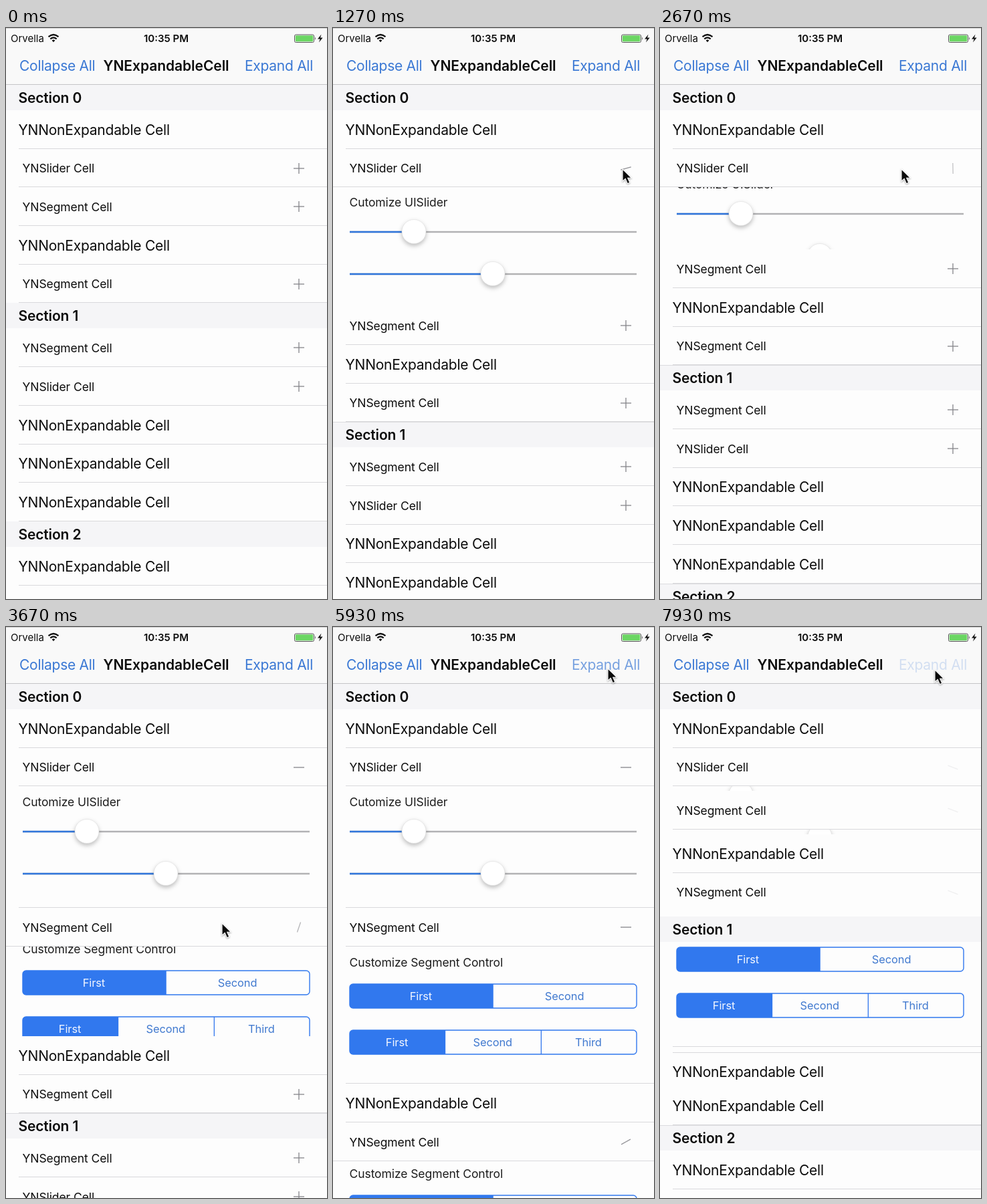
Write an HTML page that moves like this. It is 480x854 px and loops after 8000 ms.

```html
<!DOCTYPE html>
<html lang="en">
<head>
<meta charset="utf-8">
<title>Expandable cells</title>
<style>
  html, body { margin: 0; width: 100%; height: 100%; overflow: hidden; background: #fdfdfd; }
  #stage { position: relative; width: 480px; height: 854px; overflow: hidden; background: #fdfdfd;
    font: 21px Inter, "Open Sans", sans-serif; letter-spacing: -.22px; color: #0c0c0c; white-space: nowrap; }
  #stage > * { position: absolute; left: 0; }
  svg { display: block; overflow: visible; }
  .row, .head { width: 480px; box-sizing: border-box; display: flex; align-items: center; padding-left: 18.5px; }
  .row { background: #fdfdfd; z-index: 4; }
  .row.small { padding-left: 24.5px; font-size: 17.5px; letter-spacing: -.08px; }
  .row::after, .detail::after { content: ""; position: absolute; left: 19px; right: 0; bottom: 0; height: 1px; background: #d9d9dc; }
  .row.wide::after { left: 0; }
  .icon { position: absolute; left: 427px; top: 50%; margin-top: -11px; }
  .head { background: #f5f5f7; font-weight: 600; letter-spacing: -.15px; z-index: 6; }
  .head.moved { box-shadow: inset 0 1px #dcdcdf; }
  .detail { width: 480px; background: #fdfdfd; }
  .detail text { font-size: 17.5px; letter-spacing: -.08px; fill: #1c1c1c; }
  .detail .seg { font-size: 16.4px; fill: #4079cf; text-anchor: middle; }
  .detail .seg.on { fill: #f3f7ff; }
  .thumb { fill: #fff; stroke: #dedede; stroke-width: .6; filter: drop-shadow(0 3px 3px rgba(0,0,0,.25)); }
  #nav { top: 0; width: 480px; height: 85px; z-index: 7; background: #f9f9f9;
    border-bottom: 1px solid #c4c4c7; box-shadow: inset 0 1px #d0d0d0; box-sizing: border-box; }
  #nav > * { position: absolute; }
  #nav .status { top: 6px; font-size: 15px; line-height: 20px; letter-spacing: 0; }
  #nav .bar { top: 43px; line-height: 28px; }
  #nav .title { left: 145.5px; font-weight: 600; letter-spacing: -.05px; }
  #nav .link { color: #3a78d4; letter-spacing: -.27px; }
  #cursor { top: 0; z-index: 8; filter: drop-shadow(0 1px 1px rgba(0,0,0,.35)); }
</style>
</head>
<body>
<div id="stage">
  <div id="nav">
    <span class="status" style="left:7px">Orvella</span>
    <svg width="480" height="32" fill="none">
      <g stroke="#111" stroke-width="2.2">
        <path d="M63.5 13.2q7.5-6.4 15 0M66.3 16.4q4.7-4 9.4 0"/>
        <path d="M68.6 18.6q2.4-2 4.8 0l-2.4 2.6z" fill="#111" stroke="none"/>
      </g>
      <rect x="431.5" y="10" width="29" height="11.5" rx="2" stroke="#555"/>
      <rect x="432.8" y="11.3" width="26.4" height="8.9" rx="1" fill="#6bd663"/>
      <path d="M462 13.5q2 2.2 0 4.5z" fill="#555"/>
      <path d="M471.5 9.5l-5.5 7h3.6l-1.6 5 5.6-7h-3.6z" fill="#111"/>
    </svg>
    <span class="status" style="left:206px;font-weight:600">10:35 PM</span>
    <span class="bar link" id="collapse" style="left:20px">Collapse All</span>
    <span class="bar title">YNExpandableCell</span>
    <span class="bar link" id="expand" style="right:21px">Expand All</span>
  </div>
  <svg id="cursor" width="16" height="24">
    <path d="M0 0V18.2L4.2 14.4 7.4 21.8 10.8 20.3 7.7 13.2H13.2Z" fill="#0a0a0a" stroke="#fff" stroke-width="1.1"/>
  </svg>
</div>
<script>
const LOOP = 8000, MOVE = 300, ROW = 57.7, HEAD = 38;
const SLIDER_H = 182, SEGMENT_H = 205;
const COLLAPSE_ALL = 6835, EXPAND_ALL = 7897;
const BLUE = '#3178ee';
const stage = document.getElementById('stage');
const $ = id => document.getElementById(id);

function add(cls, html) {
  const el = document.createElement('div');
  el.className = cls;
  el.innerHTML = html;
  stage.append(el);
  return el;
}

const plain = () => add('row', 'YNNonExpandable Cell');
const folder = name => add('row small', `YN${name} Cell<svg class="icon" width="22" height="22" stroke="#85858a"
  stroke-width="1.3"><path d="M3 11H19"/><path d="M11 3V19"/></svg>`);

const slider = (x, y) => `<path d="M25 ${y}H454" stroke="#b2b2b4" stroke-width="2.5"/>
  <path d="M25 ${y}H${x}" stroke="#3076dc" stroke-width="2.5"/><circle class="thumb" cx="${x}" cy="${y - .5}" r="18"/>`;

function segments(y, names) {
  const w = 429.5 / names.length;
  const labels = names.map((name, i) =>
    `<text class="seg${i ? '' : ' on'}" x="${25 + w * (i + .5) - 1}" y="${y + 24}">${name}</text>` +
    (i > 1 ? `<path d="M${25 + w * i} ${y}v36" stroke="${BLUE}" stroke-width="1.3"/>` : ''));
  return `<path d="M${25 + w} ${y}H30q-5 0-5 5v26q0 5 5 5H${25 + w}z" fill="${BLUE}"/>
    <rect x="25" y="${y}" width="429" height="36" rx="5" fill="none" stroke="${BLUE}" stroke-width="1.4"/>${labels.join('')}`;
}

// Upper details lie above lower ones, and all of them below the rows
function detail(layer, h, title, body) {
  const el = add('detail', `<svg width="480" height="${h}"><text x="24.5" y="30">${title}</text>${body}</svg>`);
  el.style.zIndex = layer;
  return el;
}
const sliderDetail = layer => detail(layer, SLIDER_H, 'Cutomize UISlider', slider(121, 68) + slider(239, 131));
const segmentDetail = layer => detail(layer, SEGMENT_H, 'Customize Segment Control',
  segments(56, ['First', 'Second']) + segments(125, ['First', 'Second', 'Third']));

const heads = [0, 1, 2].map(i => add('head', 'Section ' + i));
const first = [plain(), folder('Slider'), folder('Segment'), plain(), folder('Segment')];
const second = [folder('Segment'), folder('Slider'), plain(), plain(), plain()];
const third = plain();

// Foldable rows of the first section: [time, open] steps
const folds = [
  { row: 1, h: SLIDER_H, el: sliderDetail(3),
    steps: [[998, 1], [2523, 0], [3000, 1], [COLLAPSE_ALL, 0], [EXPAND_ALL, 1]] },
  { row: 2, h: SEGMENT_H, el: segmentDetail(2),
    steps: [[3490, 1], [COLLAPSE_ALL, 0], [EXPAND_ALL, 1]] },
  { row: 4, h: SEGMENT_H, el: segmentDetail(1),
    steps: [[5680, 1], [COLLAPSE_ALL, 0], [EXPAND_ALL, 1]] }
];
const floating = segmentDetail(5);

const path = [[150, 478, 560], [850, 433, 211], [1700, 433, 211], [2350, 361, 211], [3150, 361, 211],
  [3430, 323, 443], [4400, 323, 443], [4600, 323, 440], [5070, 323, 440], [5540, 411, 62], [5960, 411, 62],
  [6680, 122, 46], [7200, 122, 46], [7740, 411, 64], [8000, 411, 64]];

const clamp = v => Math.min(1, Math.max(0, v));
const ease = k => k * k * (3 - 2 * k);

function foldState(steps, t) {
  let state = { p: 0, k: 1, open: 0, start: 0 };
  for (const [start, open] of steps) {
    if (t < start) break;
    const k = clamp((t - start) / MOVE);
    state = { p: open ? ease(k) : 1 - ease(k), k, open, start };
  }
  return state;
}

function place(el, y, h) {
  const top = Math.round(y);
  el.style.top = top + 'px';
  el.style.height = Math.round(y + h) - top + 'px';
}

function turnIcon(row, { k, open, start }) {
  const icon = row.querySelector('.icon');
  const minus = open || (k < 1 && start !== COLLAPSE_ALL);
  icon.style.transform = `rotate(${-180 * (1 - k)}deg)`;
  icon.style.opacity = k;
  icon.lastChild.style.display = minus ? 'none' : '';
}

// Touched buttons dim at once and fade back after release
function dim(t, presses) {
  for (const [down, up] of presses)
    if (t >= down && t < up + 400) return .2 + .8 * clamp((t - up) / 400);
  return 1;
}

function moveCursor(t) {
  const cursor = $('cursor');
  cursor.style.display = t < path[0][0] ? 'none' : '';
  const i = path.findIndex(step => t < step[0]);
  if (i < 1) return;
  const [t0, x0, y0] = path[i - 1], [t1, x1, y1] = path[i];
  const k = ease((t - t0) / (t1 - t0));
  cursor.style.transform = `translate(${x0 + (x1 - x0) * k}px, ${y0 + (y1 - y0) * k}px)`;
}

function draw(t) {
  const states = folds.map(f => foldState(f.steps, t));
  let y = 85;
  place(heads[0], y, HEAD);
  y += HEAD;
  first.forEach((row, i) => {
    place(row, y, ROW);
    y += ROW;
    const n = folds.findIndex(f => f.row === i);
    if (n < 0) return;
    const { el, h } = folds[n], state = states[n], { p } = state;
    turnIcon(row, state);
    row.classList.toggle('wide', p > .1 && p < 1);
    place(el, y - ROW * (1 - p), h);
    el.style.display = p ? '' : 'none';
    y += h * p;
  });

  const last = states[2], shift = y - 411.5;
  const expanding = t >= EXPAND_ALL, collapsing = t >= COLLAPSE_ALL && !expanding;
  // Rows that start or end below the screen travel a shortened way
  const offset = i => expanding ? last.p * [592, 592, 391, 391, 191][i] : collapsing ? 411 * last.p : shift;
  place(heads[1], y, HEAD);
  second.forEach((row, i) => place(row, 449.5 + ROW * i + offset(i), ROW));
  place(heads[2], 738 + offset(4), HEAD);
  place(third, 776 + offset(4), ROW);
  heads[1].classList.toggle('moved', shift > 0 && !expanding);
  heads[2].classList.toggle('moved', shift > 0);
  turnIcon(second[1], collapsing ? last : { k: 1, open: 0 });

  floating.style.display = expanding ? '' : 'none';
  place(floating, 402 + 592 * last.p, SEGMENT_H);

  $('collapse').style.opacity = dim(t, [[6760, 6860]]);
  $('expand').style.opacity = dim(t, [[5560, 5690], [7790, 7940]]);
  moveCursor(t);
}

const begin = performance.now();
function tick() {
  draw((performance.now() - begin) % LOOP);
  requestAnimationFrame(tick);
}
tick();
</script>
</body>
</html>
```
